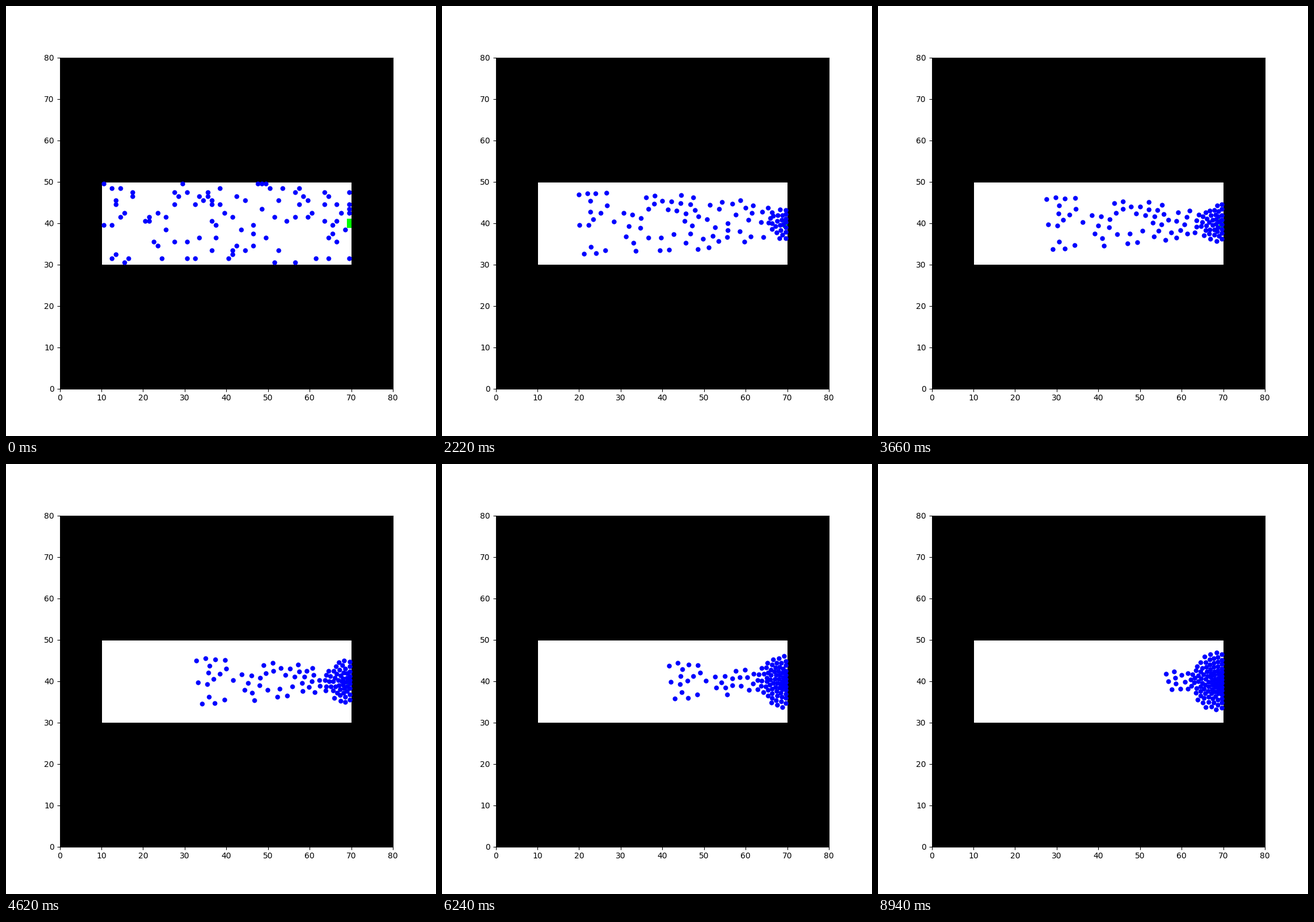
A matplotlib script that plays this animation: 748x748 px, repeating every 9000 ms.

```python
import numpy as np
import matplotlib.pyplot as plt
from matplotlib.animation import FuncAnimation
from matplotlib.patches import Rectangle

SIZE, DPI, STEPS = 748, 100, 150
LEFT, RIGHT, LOW, HIGH = 10, 70, 30, 50
SPEED, RELAX = 0.3325, 0.1
DOOR = np.array([69.8, 40.0])

# occupied columns in every row of the corridor
ROWS = {
    49: (10, 29, 47, 48, 49),
    48: (12, 14, 38, 50, 53, 57),
    47: (17, 27, 30, 35, 56, 63, 69),
    46: (17, 28, 33, 35, 42, 58, 64),
    45: (13, 34, 36, 44, 52, 59),
    44: (13, 27, 32, 36, 38, 57, 63, 66, 69),
    43: (48, 69),
    42: (15, 23, 39, 60, 67, 69),
    41: (14, 21, 25, 41, 51, 56, 59),
    40: (20, 21, 36, 54, 63, 66),
    39: (10, 12, 37, 46, 65),
    38: (25, 43, 68),
    37: (46, 65),
    36: (33, 37, 49, 64),
    35: (22, 27, 30, 66),
    34: (23, 42, 46),
    33: (36, 41, 44, 52),
    32: (13, 41),
    31: (12, 16, 24, 30, 32, 40, 61, 64, 69),
    30: (15, 51, 56),
}


def wall_push(gap):
    return 0.04 * np.exp(-np.maximum(gap - 0.5, 0) / 0.25)


def crowd_push(pos):
    """Short-range repulsion between walkers."""
    diff = pos[:, None] - pos[None]
    dist = np.hypot(diff[..., 0], diff[..., 1])
    np.fill_diagonal(dist, 1e9)
    force = 0.055 * np.exp(np.clip((1.05 - dist) / 0.22, -40, 1.2))
    return (diff / dist[..., None] * force[..., None]).sum(axis=1)


def walk(pos):
    path, vel = [pos.copy()], np.zeros_like(pos)
    sub = 2
    for _ in range(STEPS - 1):
        for _ in range(sub):
            aim = DOOR - pos
            dist = np.hypot(aim[:, 0], aim[:, 1])[:, None]
            want = SPEED * aim / np.maximum(dist, 0.6)
            acc = RELAX * (want - vel) + crowd_push(pos)
            acc[:, 0] += wall_push(pos[:, 0] - LEFT)
            acc[:, 1] += wall_push(pos[:, 1] - LOW) - wall_push(HIGH - pos[:, 1])
            vel = vel + acc / sub
            rate = np.hypot(vel[:, 0], vel[:, 1])[:, None]
            vel *= np.minimum(1, 1.3 * SPEED / np.maximum(rate, 1e-9))
            pos = pos + vel / sub
            # the end wall stops walkers
            hit = pos[:, 0] > 69.6
            vel[hit, 0] = 0
            pos[:, 0] = np.clip(pos[:, 0], LEFT + 0.4, 69.6)
            pos[:, 1] = np.clip(pos[:, 1], LOW + 0.4, HIGH - 0.4)
        path.append(pos.copy())
    return path


start = np.array([(c + 0.5, r + 0.5) for r, cols in ROWS.items() for c in cols])
path = walk(start)

fig, ax = plt.subplots(figsize=(SIZE / DPI, SIZE / DPI), dpi=DPI)
ax.set_xlim(0, 80)
ax.set_ylim(0, 80)
ax.set_facecolor("black")


def box(x0, y0, x1, y1, color):
    ax.add_patch(Rectangle((x0, y0), x1 - x0, y1 - y0, color=color, lw=0))


box(10.14, LOW, RIGHT, 49.86, "white")
box(69, 38.9, RIGHT, 41.05, "lime")
dots, = ax.plot([], [], "o", color="blue", ms=5.0, zorder=3)


def draw(i):
    dots.set_data(path[i][:, 0], path[i][:, 1])
    return dots,


anim = FuncAnimation(fig, draw, frames=STEPS, interval=60, repeat=True,
                     repeat_delay=0, blit=False)
plt.show()
```
